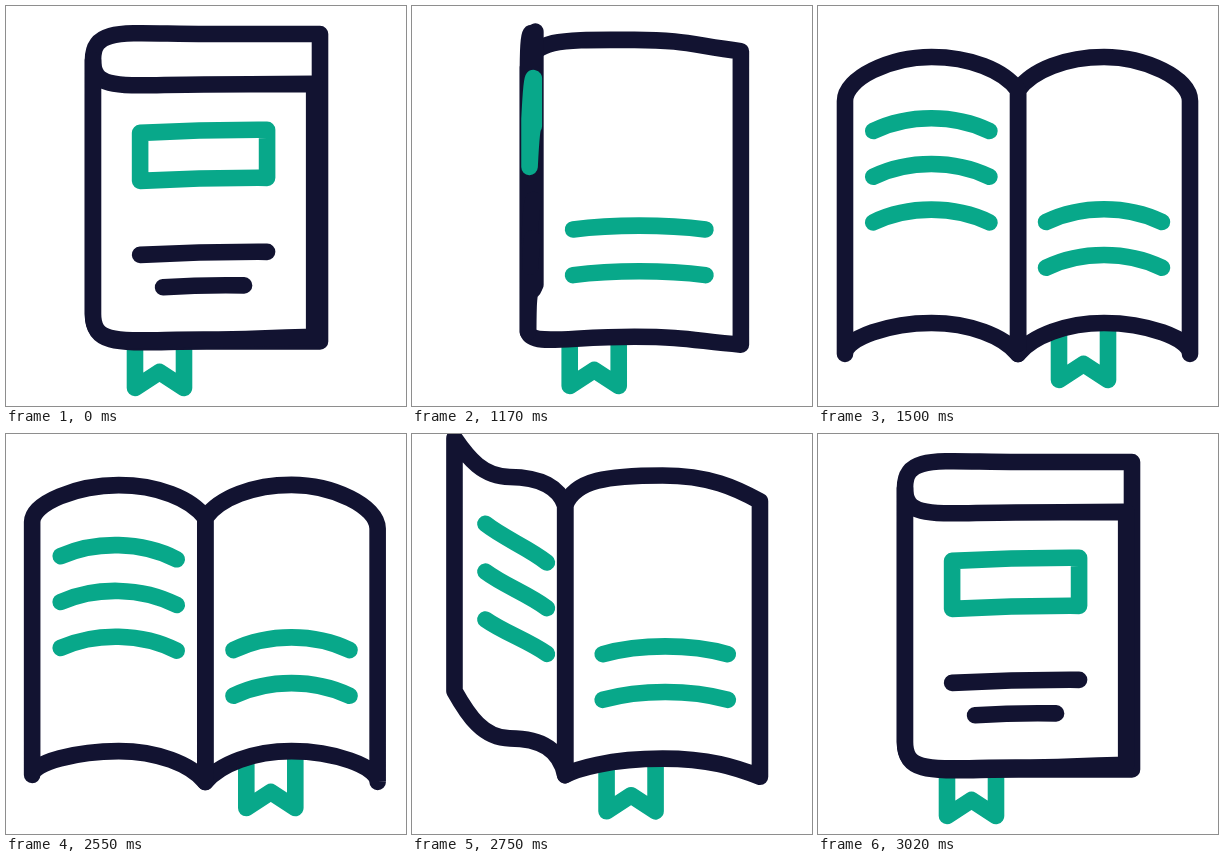
An HTML page that plays this animation: 400x400 px, repeating every 3050 ms.

```html
<!DOCTYPE html>
<html lang="en">
<head>
<meta charset="utf-8">
<title>Book</title>
<style>
  html, body { margin: 0; height: 100%; overflow: hidden; background: #fff; }
  svg { display: block; width: 100vw; height: 100vh; }
  path { fill: none; stroke-width: 16.6; stroke-linecap: round; stroke-linejoin: round; }
  .ink { stroke: #121331; }
  .green { stroke: #08a88a; }
  .paper { fill: #fff; }
</style>
</head>
<body>
<svg id="stage" viewBox="0 0 400 400"></svg>
<script>
const LOOP = 3050, OPEN_AT = 1020, CLOSE_AT = 2550, STEPS = 20;
const COVER_HEIGHT = 253, LINE_GAP = 45.7;
const stage = document.getElementById('stage');

const mix = (a, b, t) => a + (b - a) * t;
const draw = (kind, d) => `<path class="${kind}" d="${d}"/>`;
const curve = ([first, ...rest]) => `M${first}C${rest}`;
const lower = (points, dy) => points.map(([x, y]) => [x, y + dy]);

// Page edge from the spine over a level middle to the fore edge.
// The hook rounds the spine corner while the book is closed.
function pageEdge(spine, middleY, fore, hook, open) {
  const middleX = (spine[0] + fore[0]) / 2, half = middleX - spine[0];
  return [
    spine,
    [spine[0] + 0.17 * open * half, middleY + mix(hook, 13, open)],
    [middleX - mix(0.72, 0.44, open) * half, middleY],
    [middleX, middleY],
    [middleX + 0.48 * half, middleY],
    [fore[0] - 0.6 * (1 - open) * half, mix(middleY, fore[1], 0.48)],
    fore
  ];
}

function page(top, bottom) {
  const [fore, ...rest] = [...bottom].reverse();
  return draw('ink paper', `${curve(top)}L${fore}C${rest}Z`);
}

function ribbon(open) {
  const x = mix(129, 241, open), y = mix(382, 374, open);
  return draw('green', `M${x} 325V${y}l24.5 -16l24.5 16V325`);
}

function pageText(spineX, open) {
  const from = spineX + mix(51, 28, open), to = spineX + mix(189, 144, open);
  const y = mix(226, 216, open), crest = y - mix(1, 17, open);
  const line = [[from, y], [mix(from, to, 0.3), crest], [mix(from, to, 0.7), crest], [to, y]];
  return draw('green', curve(line)) + draw('green', curve(lower(line, LINE_GAP)));
}

function frontCover(spineX, foreX, bow) {
  const point = (along, y) => [mix(spineX, foreX, along), y - 1.5 * bow * along];
  const line = (inset, y) =>
    `${point(inset, y)}Q${point(0.5, y - bow / 2)} ${point(1 - inset, y)}`;
  const corner = point(0.787, 176);
  return draw('green', `M${line(0.213, 128)}L${corner}` +
      `Q${point(0.5, 176 - bow / 2)} ${point(0.213, 176)}Z`) +
    draw('ink', 'M' + line(0.213, 250)) +
    draw('ink', 'M' + line(0.317, 283));
}

function insideCover(spineX, foreX, lift, open) {
  const nearX = mix(spineX, foreX, 0.165);
  const farX = mix(spineX, foreX, mix(0.555, 0.837, open));
  const bend = 17 * (2.4 * open - 1.4);
  return [0, 1, 2].map(row => {
    const near = 125 + 0.04 * lift + row * LINE_GAP;
    const far = 125 - 0.41 * lift + row * (LINE_GAP + 0.025 * lift);
    return draw('green', curve([
      [nearX, near],
      [mix(nearX, farX, 0.3), mix(near, far, 0.38) - bend],
      [mix(nearX, farX, 0.7), mix(near, far, 0.62) - bend],
      [farX, far]
    ]));
  }).join('');
}

function render(u) {
  const open = u ** 1.72 / (u ** 1.72 + (1 - u) ** 1.72);
  const blend = (closed, opened) => mix(closed, opened, open);

  const spineX = blend(87, 200), backX = blend(314, 372);
  const spineTop = [spineX, blend(54, 84)];
  const spineBottom = [spineX, mix(308, 348, 1 - (1 - open) ** 2)];
  const backTop = pageEdge(spineTop, blend(28, 51), [backX, blend(28, 95)], -8, open);
  const backBottom = pageEdge(spineBottom, blend(335.5, 317), [backX, blend(335.5, 348)], 8, open);

  // The cover swings from slightly ajar to flat, rising on the way.
  const angle = Math.PI * (1 - 0.922 * (1 - u) ** 1.37);
  const height = Math.max(0, Math.sin(angle));
  const lift = (28 + 265 * u * u) * height ** 1.2;
  const bow = blend(60, 10) * height ** 2;
  const foreX = spineX + blend(228, 173) * Math.cos(angle);
  const foreY = blend(83, 95) - lift;
  const coverTop = pageEdge(spineTop, blend(82, 51) - bow, [foreX, foreY], 8, open);
  const coverBottom = pageEdge(spineBottom, blend(337, 317) - bow,
    [foreX, foreY + COVER_HEIGHT], 8, open);

  stage.innerHTML =
    ribbon(open) +
    page(backTop, backBottom) +
    pageText(spineX, open) +
    page(coverTop, coverBottom) +
    (foreX > spineX ? frontCover(spineX, foreX, bow) : insideCover(spineX, foreX, lift, open));
}

// Steps alternate between 20 and 30 ms.
const ticks = (ms, first) => Math.floor(ms / 50) * 2 + (ms % 50 >= first ? 1 : 0);

function stepAt(t) {
  if (t < OPEN_AT) return 0;
  if (t < CLOSE_AT) return Math.min(STEPS, 1 + ticks(t - OPEN_AT, 30));
  return Math.max(0, STEPS - 1 - ticks(t - CLOSE_AT, 20));
}

let shown = -1;
const start = performance.now();
function frame() {
  const step = stepAt((performance.now() - start) % LOOP);
  if (step !== shown) render((shown = step) / STEPS);
  requestAnimationFrame(frame);
}
frame();
</script>
</body>
</html>
```
